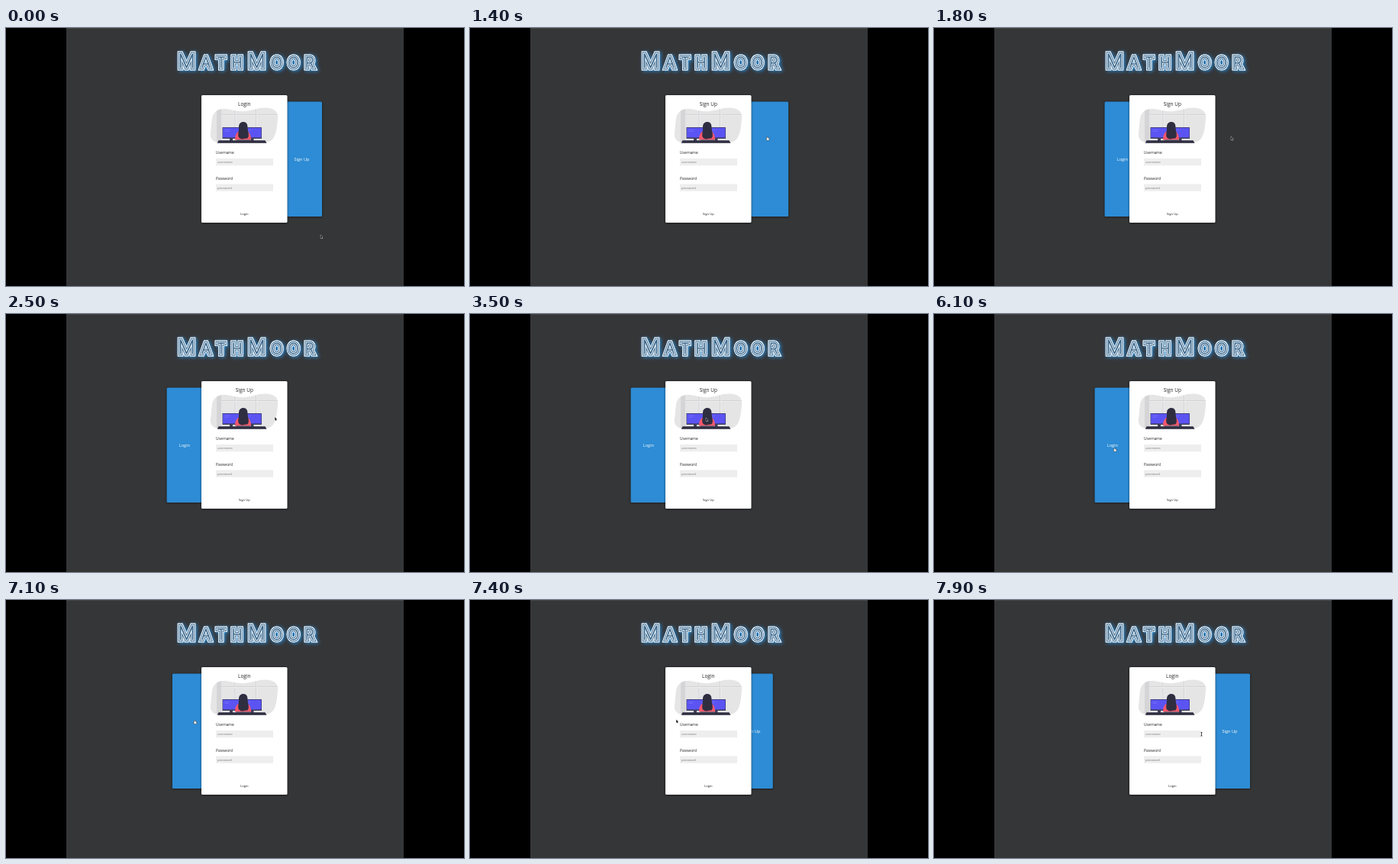
These frames come from a looping animation (600 by 338 pixels, 8000 ms). An HTML page with a canvas:

```html
<!DOCTYPE html>
<html lang="en">
<head>
<meta charset="utf-8">
<title>MathMoor login</title>
<style>
html, body { margin: 0; width: 100%; height: 100%; overflow: hidden; background: #000; }
canvas { display: block; }
</style>
</head>
<body>
<canvas id="stage" width="600" height="338"></canvas>
<script>
const ctx = document.getElementById('stage').getContext('2d');
const LOOP = 8000, STEP = 100;
const SANS = '"Open Sans", "Noto Sans", sans-serif';
const PANEL = { y: 96.5, w: 113, h: 150.5 };
const CARD = { x: 256, y: 88, w: 112.5, h: 167 };

// [time, x, y]
const mouse = [
  [0, 413, 273], [100, 411, 262], [400, 398, 205], [800, 390, 146], [1300, 390, 145],
  [2100, 390, 144], [2900, 316, 130], [3500, 310, 138], [4500, 312, 146],
  [5300, 290, 160], [6000, 237, 178], [6500, 237, 177], [6900, 247, 160],
  [7200, 248, 160], [7500, 279, 158], [7700, 280, 158], [7900, 350.5, 175.5]
];
// [time, left edge]
const slide = [
  [0, 301], [400, 301], [750, 307], [1338, 307], [1938, 210.6],
  [6080, 210.6], [6400, 205], [6962, 205], [7562, 301]
];

const smooth = u => u * u * (3 - 2 * u);

function track(keys, t) {
  let i = 0;
  while (i < keys.length - 1 && keys[i + 1][0] <= t) i++;
  const a = keys[i], b = keys[i + 1];
  if (!b) return a.slice(1);
  const u = smooth((t - a[0]) / (b[0] - a[0]));
  return a.slice(1).map((v, k) => v + (b[k + 1] - v) * u);
}

function box(x, y, w, h, color, r = 0) {
  ctx.fillStyle = color;
  ctx.beginPath();
  ctx.roundRect(x, y, w, h, r);
  ctx.fill();
}

function raised(x, y, w, h, color) {
  ctx.save();
  ctx.shadowColor = 'rgba(0,0,0,.6)';
  ctx.shadowBlur = 3;
  ctx.shadowOffsetY = 0.5;
  box(x, y, w, h, color, 1.5);
  ctx.restore();
}

function shape(d, color) {
  ctx.fillStyle = color;
  ctx.fill(new Path2D(d));
}

function line(d, color, width) {
  ctx.strokeStyle = color;
  ctx.lineWidth = width;
  ctx.stroke(new Path2D(d));
}

function label(text, x, y, size, color, align = 'left', weight = 400) {
  ctx.font = `${weight} ${size}px ${SANS}`;
  ctx.textAlign = align;
  ctx.fillStyle = color;
  ctx.fillText(text, x, y);
}

// Neon title: nested outlines around a thin face, in small caps
function drawTitle() {
  const name = 'MathMoor', gap = 8.2, base = 52;
  ctx.save();
  ctx.textAlign = 'left';
  ctx.lineJoin = 'miter';
  ctx.miterLimit = 2.5;
  let x = 0;
  const glyphs = [...name].map(c => {
    const ch = c.toUpperCase();
    const font = `100 ${c === ch ? 24.7 : 18.6}px Inter, "Open Sans", sans-serif`;
    ctx.font = font;
    const g = { ch, font, x };
    x += ctx.measureText(ch).width + gap;
    return g;
  });
  const left = 314.5 - (x - gap) / 2;
  const ring = (g, width, color) => {
    ctx.font = g.font;
    ctx.strokeStyle = color;
    ctx.lineWidth = width;
    ctx.strokeText(g.ch, left + g.x, base);
  };
  ctx.shadowColor = '#2b8fdb';
  ctx.shadowBlur = 5;
  ctx.shadowOffsetX = 1.5;
  ctx.shadowOffsetY = 0.5;
  glyphs.forEach(g => ring(g, 7, '#e8f4fd'));
  ctx.shadowColor = 'transparent';
  for (const g of glyphs) {
    ring(g, 7, '#eef7fe');
    ring(g, 5, '#3a668a');
    ring(g, 3.2, '#eef7fe');
    ring(g, 1.1, '#3a668a');
  }
  ctx.restore();
}

function monitor(x) {
  box(x + 9.5, 144, 4, 4, '#3f3d56');
  box(x, 130, 24, 15, '#3f3d56', 0.6);
  box(x + 0.6, 130.7, 22.8, 12.8, '#5b54f3');
  line(`M${x + 3} 133.5h7 M${x + 3} 135.5h5`, '#7d78f8', 0.6);
}

function drawOffice() {
  const blob = 'M270 119C271 110 279 105 288 106C297 107 303 110 313 109' +
    'C324 108 330 104 341 104.5C352 105 357 110 356 119C355 128 355 134 352 141' +
    'C349 148 344 150.5 336 150.5L280 150.5C271 150 267 145 268 137C269 131 269 125 270 119Z';
  ctx.save();
  ctx.clip(new Path2D(blob));
  box(266, 102, 92, 50, '#e5e5e6');
  box(276, 102, 6, 50, '#d5d5d7');
  line('M282 113.5H358 M300 102V151 M327.5 102V151', '#cfcfd1', 0.8);
  line('M282 114.5H358 M301 102V151 M328.5 102V151', '#f2f2f2', 0.6);
  ctx.restore();

  monitor(283.5);
  monitor(311);
  shape('M278.5 147.3H339.5L341.5 150.7H276.8Z', '#2f2e41');
  shape('M300 146.5C300 140 302 136 307 135H314C319 136 321 140 321 146.5Z', '#f5576c');
  shape('M305 130C305 125 307.5 123 311 123C315 123 316.5 126 316.5 130' +
    'C316.5 134 318 137 317.8 141C317.6 144 316 145.5 313.5 144.5' +
    'C310 146.5 305 145.5 304.3 141.5C303.7 138 305.5 134 305 130Z', '#2f2e41');
  line('M301.5 147H320', '#2f2e41', 1);
}

function field(name, y) {
  label(name, 275, y, 4.9, '#222', 'left', 500);
  box(275, y + 6, 75, 9.2, '#eeeeee', 0.5);
  label(name.toLowerCase(), 277, y + 12.3, 4.2, '#7b7b7b');
}

function drawCard(title) {
  raised(CARD.x, CARD.y, CARD.w, CARD.h, '#ffffff');
  label(title, 312.3, 102.3, 6.5, '#222', 'center');
  drawOffice();
  field('Username', 165);
  field('Password', 198.5);
  label(title, 312.3, 245, 4.2, '#222', 'center');
}

function drawMouse(x, y, left) {
  const inCard = x > CARD.x && x < CARD.x + CARD.w && y > CARD.y && y < CARD.y + CARD.h;
  const inField = x > 275 && x < 351 && ((y > 171 && y < 181) || (y > 204 && y < 214));
  const inPanel = !inCard && x > left && x < left + PANEL.w && y > PANEL.y && y < PANEL.y + PANEL.h;
  ctx.save();
  ctx.translate(x, y);
  if (inField) {
    line('M-1 -2H1 M0 -2V2.5 M-1 2.5H1', '#222', 0.8);
  } else if (inPanel) {
    shape('M-1.3 -2.2L0 -2.2L0.3 -1L2 -.6L2 1.5L1 2.4H-1L-2 .5L-1.2 0Z', '#f4f4f4');
    line('M-1.3 -2.2L0 -2.2L0.3 -1L2 -.6L2 1.5L1 2.4H-1L-2 .5L-1.2 0Z', '#333', 0.5);
  } else {
    const arrow = 'M-.7 -1.8L2 1L.9 1.2L1.5 2.5L.7 2.8L.1 1.5L-.7 2.2Z';
    line(arrow, '#e8e8e8', 0.9);
    shape(arrow, '#111');
  }
  ctx.restore();
}

function draw(time) {
  const t = Math.floor((time % LOOP) / STEP) * STEP;
  const [left] = track(slide, t);
  const [mx, my] = track(mouse, t);
  const signUp = t >= 1300 && t < 7000;

  box(0, 0, 600, 338, '#000');
  box(79, 0, 442, 338, '#353638');
  box(79, 0, 442, 1, '#434446');
  drawTitle();
  raised(left, PANEL.y, PANEL.w, PANEL.h, '#2d8cd5');
  if (signUp) label('Login', left + 23.3, 174, 5.6, '#fff', 'center');
  else label('Sign Up', left + PANEL.w - 26.5, 174, 5.6, '#fff', 'center');
  drawCard(signUp ? 'Sign Up' : 'Login');
  drawMouse(mx, my, left);
}

let start;
function tick(now) {
  if (start === undefined) start = now;
  draw(now - start);
  requestAnimationFrame(tick);
}
requestAnimationFrame(tick);
</script>
</body>
</html>
```
